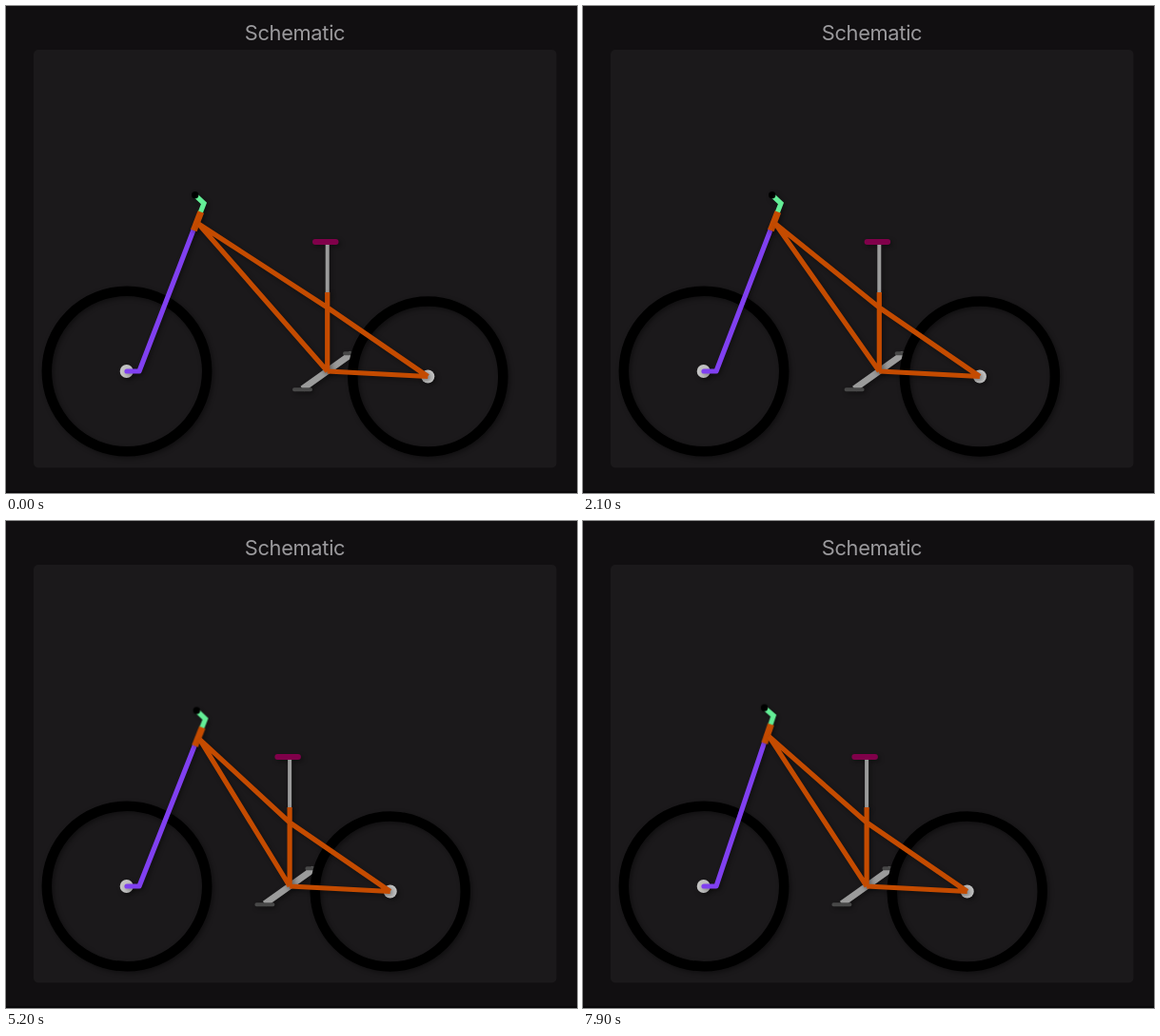
Animation of 600x512 px, one loop 8 s. Source, as an HTML page:

```html
<!DOCTYPE html>
<html lang="en">
<head>
<meta charset="utf-8">
<title>Schematic</title>
<style>
  html, body { margin: 0; height: 100%; overflow: hidden; background: #110f11; }
  svg { display: block; width: 100vw; height: 100vh; }
  text { font: 21.8px Inter, sans-serif; letter-spacing: -.3px; fill: #9b9a9d; text-anchor: middle; }
  .line { fill: none; stroke-width: 5.2; }
  .round { stroke-linecap: round; stroke-linejoin: round; }
  .tire { fill: none; stroke: #000; stroke-width: 10.5; }
  .hub { fill: #c3c3c3; }
  .frame { stroke: #c44b00; }
  .metal { stroke: #9b9b9b; }
  .pedal { stroke: #484848; stroke-width: 4; }
  .shadow > * { filter: drop-shadow(2px 2px 2.5px rgba(0, 0, 0, .4)); }
</style>
</head>
<body>
<svg viewBox="0 0 600 512">
  <rect y="510" width="600" height="2" fill="#09080a"/>
  <text x="303.5" y="36">Schematic</text>
  <rect x="29" y="46" width="549.5" height="439.5" rx="5" fill="#1b191b"/>
  <g class="shadow">
    <circle class="tire" cx="127" cy="384" r="84.2"/>
    <circle class="hub" cx="126.7" cy="384" r="7"/>
    <g id="rear">
      <path class="line metal" d="M337.7 250V303" style="stroke-width:4"/>
      <path class="line round" d="M325 248H346.5" stroke="#80004a" style="stroke-width:6"/>
      <path class="line metal" d="M311.5 402.5L363.5 365.5" style="stroke-width:7"/>
      <path class="line round pedal" d="M303 403.3H320M356 365.3H371"/>
      <circle class="tire" cx="443.3" cy="389.5" r="79"/>
      <circle class="hub" cx="443.3" cy="389.5" r="7"/>
    </g>
    <path id="fork" class="line round" stroke="#8040f0"/>
    <g id="steering">
      <path class="line" d="M204.3 217L208 207.5L200 200" stroke="#63ee96"/>
      <circle cx="198.7" cy="198.7" r="3.7"/>
      <path class="line frame" d="M197.3 236L204.8 216.5" style="stroke-width:7"/>
    </g>
    <path id="frame" class="line frame" stroke-linejoin="round"/>
  </g>
</svg>
<script>
  const LOOP = 8000, BASE_ANGLE = 69, REACH_STEP = 13.2;
  const PIVOT = { x: 140, y: 384 };
  const REACH_CHANGES = [1000, 2000, 2400];
  const byId = id => document.getElementById(id);
  const [rear, frame, steering, fork] = ['rear', 'frame', 'steering', 'fork'].map(byId);

  const reachShift = t => -REACH_STEP * REACH_CHANGES.filter(c => t >= c).length;

  // Slackens once, then steepens in half-degree increments.
  function headAngle(t) {
    if (t < 4900) return BASE_ANGLE;
    const steps = Math.floor((t - 6400) / 200);
    return BASE_ANGLE - .5 + .5 * Math.min(6, Math.max(0, steps));
  }

  // Point on the steering axis, moved sideways by an offset.
  function onAxis(distance, degrees, offset = 0) {
    const a = degrees * Math.PI / 180, cos = Math.cos(a), sin = Math.sin(a);
    return `${PIVOT.x + distance * cos + offset * sin} ${PIVOT.y - distance * sin + offset * cos}`;
  }

  function draw(t) {
    const shift = reachShift(t), angle = headAngle(t);
    const bottom = 337.7 + shift, axle = 443.3 + shift;
    const joint = onAxis(167, angle, 2.5);
    rear.setAttribute('transform', `translate(${shift} 0)`);
    steering.setAttribute('transform', `rotate(${BASE_ANGLE - angle} ${PIVOT.x} ${PIVOT.y})`);
    fork.setAttribute('d', `M127 384H${PIVOT.x}L${onAxis(160, angle)}`);
    frame.setAttribute('d', `M${bottom} 301V384M${bottom} 384L${axle} 389.5` +
      `M${joint}L${bottom} 317L${axle} 389.5M${joint}L${bottom} 384`);
  }

  function tick(now) {
    draw(now % LOOP);
    requestAnimationFrame(tick);
  }
  draw(0);
  requestAnimationFrame(tick);
</script>
</body>
</html>
```
